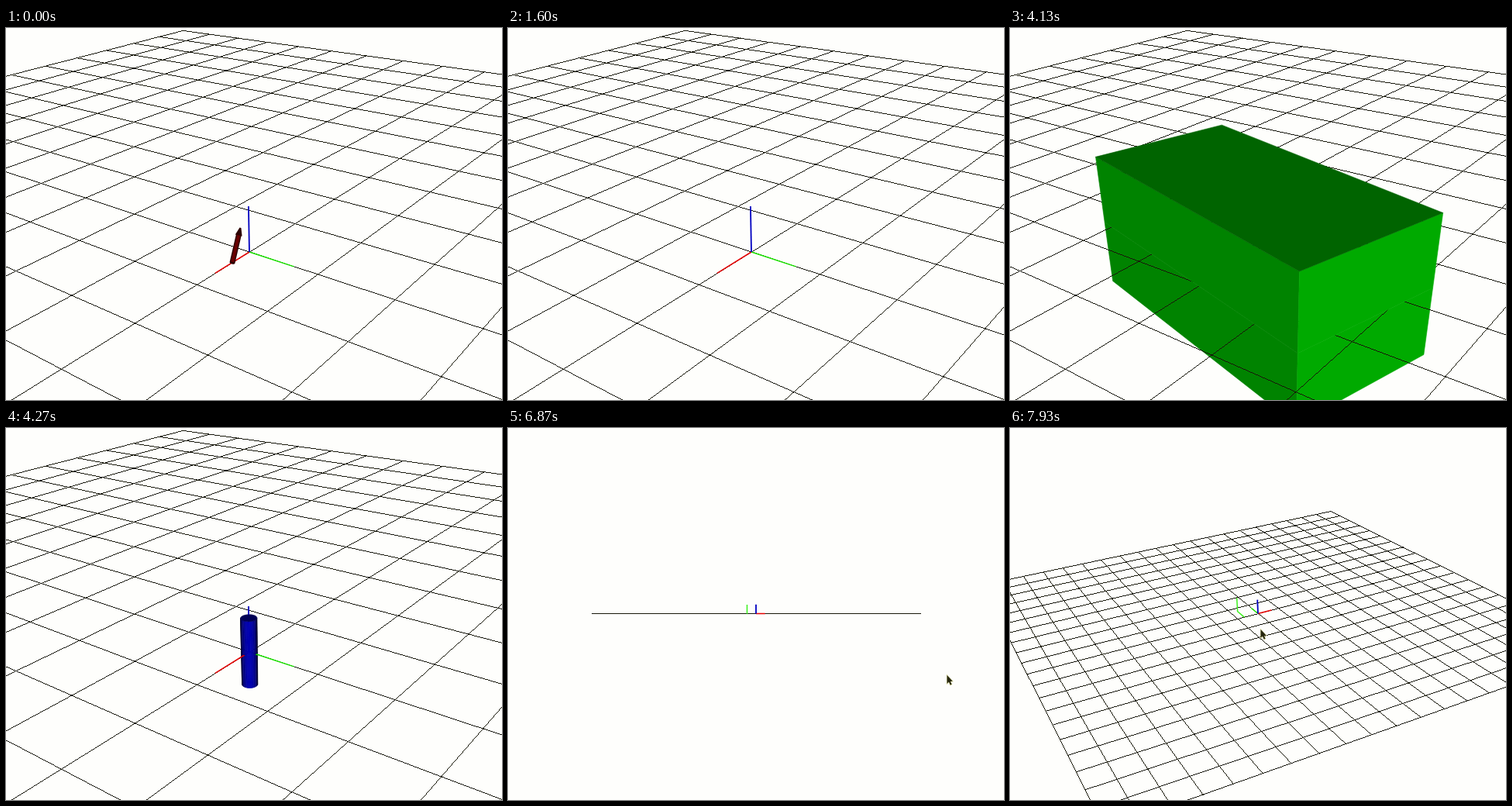
Animation, 640 px wide and 480 px high, one loop 8 s. Source, as an HTML page with a canvas:

```html
<!DOCTYPE html>
<html>
<head>
<meta charset="utf-8">
<style>
html, body { margin: 0; width: 100%; height: 100%; overflow: hidden; background: #fefefc; }
canvas { display: block; }
</style>
</head>
<body>
<canvas id="stage" width="640" height="480"></canvas>
<script>
const ctx = document.getElementById('stage').getContext('2d');
const LOOP = 8000, FPS = 15, HALF = 10, AXIS = 2 / 3;
const BACKGROUND = '#fefefc', GRID_COLOR = '#18180a';
const EYE = [7.1, 5.5, 4];

// Cameras map a point (in grid cells) to homogeneous screen coordinates.
const closeCamera = ([x, y, z]) => [
  314 - 86.3 * x + 64.7 * y - 18.8 * z,
  289 + 17.6 * x + 10.5 * y - 101.1 * z,
  1 - 0.0745 * x - 0.058 * y - 0.055 * z
];

function orbitCamera(turn, pitch, roll, scale) {
  const focal = 1000;
  return ([x, y, z]) => {
    const across = x * Math.cos(turn) - y * Math.sin(turn);
    const ahead = x * Math.sin(turn) + y * Math.cos(turn);
    const rise = ahead * Math.sin(pitch) + z * Math.cos(pitch);
    const right = across * Math.cos(roll) - rise * Math.sin(roll);
    const up = across * Math.sin(roll) + rise * Math.cos(roll);
    const depth = 1 + scale / focal * (ahead * Math.cos(pitch) - z * Math.sin(pitch));
    return [320 * depth + scale * right, 239.5 * depth - scale * up, depth];
  };
}

let camera = closeCamera;
const mix = (a, b, k) => a + (b - a) * k;
const mixPoint = (p, q, k) => p.map((v, i) => mix(v, q[i], k));
const progress = (v, from, to) => Math.min(1, Math.max(0, (v - from) / (to - from)));

function project(point) {
  const [x, y, w] = camera(point);
  return [x / w, y / w];
}

// One pixel wide line without smoothing, clipped to the stage.
function pixelLine(a, b) {
  const near = 0.05;
  let p = camera(a), q = camera(b);
  if (p[2] < near && q[2] < near) return;
  if (p[2] < near) p = mixPoint(p, q, (near - p[2]) / (q[2] - p[2]));
  if (q[2] < near) q = mixPoint(q, p, (near - q[2]) / (p[2] - q[2]));
  p = [p[0] / p[2], p[1] / p[2]];
  q = [q[0] / q[2], q[1] / q[2]];
  const major = Math.abs(q[0] - p[0]) >= Math.abs(q[1] - p[1]) ? 0 : 1, minor = 1 - major;
  if (p[major] > q[major]) [p, q] = [q, p];
  const slope = (q[minor] - p[minor]) / (q[major] - p[major] || 1);
  const end = Math.min(major ? 479 : 639, Math.round(q[major]));
  for (let i = Math.max(0, Math.round(p[major])); i <= end; i++) {
    const j = Math.floor(p[minor] + (i - p[major]) * slope);
    if (major) ctx.fillRect(j, i, 1, 1); else ctx.fillRect(i, j, 1, 1);
  }
}

function drawGrid() {
  ctx.fillStyle = GRID_COLOR;
  for (let i = -HALF; i <= HALF; i++) {
    pixelLine([i, -HALF, 0], [i, HALF, 0]);
    pixelLine([-HALF, i, 0], [HALF, i, 0]);
  }
}

function polyline(points, color, width = 1.5) {
  ctx.strokeStyle = color;
  ctx.lineWidth = width;
  ctx.beginPath();
  points.forEach(p => ctx.lineTo(...project(p)));
  ctx.stroke();
}

function drawAxes() {
  polyline([[0, 0, 0], [AXIS, 0, 0]], '#e60000');
  polyline([[0, 0, 0], [0, AXIS, 0]], '#1ee600');
  polyline([[0, 0, 0], [0, 0, AXIS]], '#0000c0', 1.8);
}

function face(points, color) {
  ctx.beginPath();
  points.forEach(p => ctx.lineTo(...project(p)));
  ctx.closePath();
  ctx.fillStyle = ctx.strokeStyle = color;
  ctx.lineWidth = 0.6;
  ctx.fill();
  ctx.stroke();
}

// Upright prism lit from the viewer; the base runs counter-clockwise.
function prism(base, z0, z1, paint, capped) {
  base.forEach((a, i) => {
    const b = base[(i + 1) % base.length];
    const length = Math.hypot(b[0] - a[0], b[1] - a[1]);
    const nx = (b[1] - a[1]) / length, ny = (a[0] - b[0]) / length;
    if (nx * (EYE[0] - a[0]) + ny * (EYE[1] - a[1]) <= 0) return;
    const light = Math.max(0, nx * 0.726 + ny * 0.566);
    face([[...a, z0], [...b, z0], [...b, z1], [...a, z1]], paint(light));
  });
  if (capped) face(base.map(p => [...p, z1]), paint(0.41));
}

// The floor hides nothing below it but its lines lie over the lower half.
function drawSolid(base, height, paint) {
  prism(base, -height, 0, paint, false);
  drawGrid();
  drawAxes();
  prism(base, 0, height, paint, true);
}

function drawBox(angle) {
  const c = Math.cos(angle), s = Math.sin(angle);
  const base = [[1, -2], [1, 2], [-1, 2], [-1, -2]].map(([x, y]) => [x * c - y * s, x * s + y * c]);
  drawSolid(base, 1, light => `rgb(0,${Math.round(12 + 215 * light)},0)`);
}

function drawCylinder() {
  const base = Array.from({ length: 32 }, (_, i) => {
    const a = i * Math.PI / 16;
    return [0.1 * Math.cos(a), 0.1 * Math.sin(a)];
  });
  drawSolid(base, 0.5, light => `rgb(0,0,${Math.round(10 + 180 * light)})`);
  polyline([[0, 0, 0.55], [0, 0, AXIS]], '#0000c0');
}

function drawArrow(angle) {
  const [x0, y0] = project([0.34, 0, 0]);
  const [x1, y1] = project([0.34 - 0.17 * Math.cos(angle), -0.17 * Math.sin(angle), 0.42]);
  const length = Math.hypot(x1 - x0, y1 - y0), neck = length - 9;
  ctx.save();
  ctx.translate(x0, y0);
  ctx.rotate(Math.atan2(y1 - y0, x1 - x0));
  ctx.fillStyle = '#2c0000';
  ctx.beginPath();
  ctx.ellipse(0, 0, 2, 3.5, 0, 0, 7);
  ctx.rect(0, -3.5, neck, 7);
  ctx.moveTo(neck, -4.5);
  ctx.lineTo(length + 1, -1);
  ctx.lineTo(length + 1, 1);
  ctx.lineTo(neck, 4.5);
  ctx.fill();
  ctx.fillStyle = '#680000';
  ctx.fillRect(1, -2, neck - 1, 4);
  ctx.restore();
}

function drawPointer(x, y) {
  const size = 0.9;
  ctx.beginPath();
  [[0, 0], [0, 12], [2.7, 9.5], [4.7, 14], [6.7, 13], [4.7, 8.8], [8, 8.5]]
    .forEach(([dx, dy]) => ctx.lineTo(x + 0.5 + dx * size, y + 1 + dy * size));
  ctx.closePath();
  ctx.strokeStyle = '#d8d8a0';
  ctx.lineWidth = 1.2;
  ctx.stroke();
  ctx.fillStyle = '#26260e';
  ctx.fill();
}

function drawOrbitScene(tick) {
  const tilt = progress(tick, 103, 110);
  const zoom = Math.min(4, Math.max(0, tick - 115));
  camera = orbitCamera(0.458 * tilt, 0.4525 * tilt, 0.0438 * tilt, 17.51 / 0.877 ** zoom);
  drawGrid();
  drawAxes();
  if (tick >= 86)
    polyline([[-AXIS, 0, 0], [-AXIS, AXIS, 0], [-AXIS, AXIS, AXIS]], '#3cf01e');
  const dragged = mixPoint([566, 318], [558, 388], tilt);
  drawPointer(...mixPoint(dragged, [323, 259], progress(tick, 110, 115)));
}

function draw(time) {
  const tick = Math.floor((time % LOOP + 4) * FPS / 1000);
  ctx.fillStyle = BACKGROUND;
  ctx.fillRect(0, 0, 640, 480);
  camera = closeCamera;
  if (tick >= 75) drawOrbitScene(tick);
  else if (tick >= 64) drawCylinder();
  else if (tick >= 51) drawBox((tick - 51) * Math.PI / 12);
  else {
    drawGrid();
    drawAxes();
    if (tick < 24) drawArrow(tick * Math.PI / 12);
  }
}

const start = performance.now();
function loop() {
  draw(performance.now() - start);
  requestAnimationFrame(loop);
}
loop();
</script>
</body>
</html>
```
